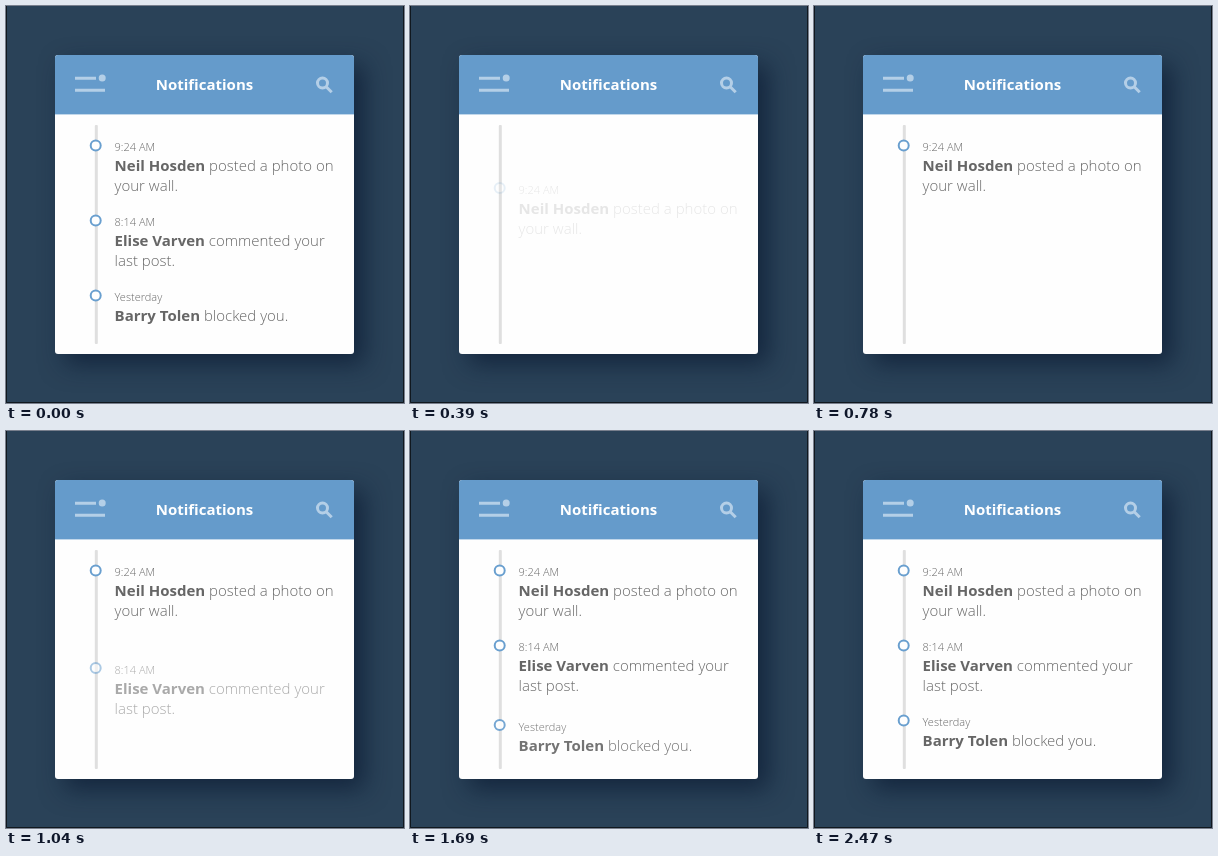
An HTML page that plays this animation: 398x397 px, repeating every 2.6 s.

```html
<!DOCTYPE html>
<html lang="en">
<head>
<meta charset="utf-8">
<title>Notifications</title>
<style>
  html, body { margin: 0; width: 100%; height: 100%; overflow: hidden; background: #2a4258; }
  svg { position: absolute; left: 0; top: 0; }
  .card {
    position: absolute; left: 49px; top: 49px; width: 299px; height: 299px;
    border-radius: 3px; background: #fefefe;
    box-shadow: 10px 10px 25px rgba(10, 26, 50, .7);
  }
  text { font: 300 15px "Open Sans", sans-serif; fill: #666; }
  .title { font-weight: 700; fill: #fff; text-anchor: middle; }
  .time { font-size: 11px; }
  .name { font-weight: 700; }
  .icon { fill: none; stroke: #b4cfe7; stroke-width: 3; }
</style>
</head>
<body>
<div class="card"></div>
<svg width="398" height="397" viewBox="0 0 398 397">
  <clipPath id="cardClip"><rect x="49" y="49" width="299" height="299" rx="3"/></clipPath>
  <path d="M.5 0V396.5H397.5V0" fill="none" stroke="#10181f"/>
  <g clip-path="url(#cardClip)">
    <rect x="49" y="49" width="299" height="59.4" fill="#659bcb"/>
    <path class="icon" d="M69 72.2H90M69 84.2H99"/>
    <circle cx="96.2" cy="72" r="3.5" fill="#b4cfe7"/>
    <circle class="icon" cx="316.5" cy="77" r="5"/>
    <path class="icon" d="M320.2 80.7L325.7 86.2"/>
    <text class="title" x="198.5" y="84.2">Notifications</text>
    <rect x="88.8" y="119" width="3" height="219" rx="1" fill="#dfdfdf"/>
    <g id="list"></g>
  </g>
</svg>
<script>
const LOOP = 2600, STEP = 130;
const FIRST = 255, GAP = 520, RISE = 500, DROP = 50;

const items = [
  ["9:24 AM", "Neil Hosden", "posted a photo on", "your wall."],
  ["8:14 AM", "Elise Varven", "commented your", "last post."],
  ["Yesterday", "Barry Tolen", "blocked you.", ""]
];

const list = document.getElementById("list");
list.innerHTML = items.map(([time, name, action, rest]) => `<g>
  <circle cx="89.7" cy="139.5" r="5" fill="#fefefe" stroke="#699fcf" stroke-width="2"/>
  <text class="time" x="108.6" y="145.3">${time}</text>
  <text x="108.6" y="165.3"><tspan class="name">${name}</tspan> ${action}</text>
  <text x="108.6" y="185.3">${rest}</text>
</g>`).join("");
const cells = [...list.children];

// cubic-bezier(.42, 0, .58, 1), solved by bisection
function easeInOut(x) {
  if (x <= 0) return 0;
  if (x >= 1) return 1;
  let lo = 0, hi = 1, s;
  for (let i = 0; i < 24; i++) {
    s = (lo + hi) / 2;
    const bx = 1.26 * (1 - s) ** 2 * s + 1.74 * (1 - s) * s * s + s ** 3;
    if (bx < x) lo = s; else hi = s;
  }
  return s * s * (3 - 2 * s);
}

function draw(now) {
  const t = Math.floor(now % LOOP / STEP) * STEP;
  cells.forEach((cell, i) => {
    // the finished list holds for one step before it restarts
    const p = t < STEP ? 1 : easeInOut((t - FIRST - i * GAP) / RISE);
    cell.setAttribute("opacity", p);
    cell.setAttribute("transform", `translate(0 ${i * 75 + DROP * (1 - p)})`);
  });
}

const start = performance.now();
function tick() {
  draw(performance.now() - start);
  requestAnimationFrame(tick);
}
tick();
</script>
</body>
</html>
```
